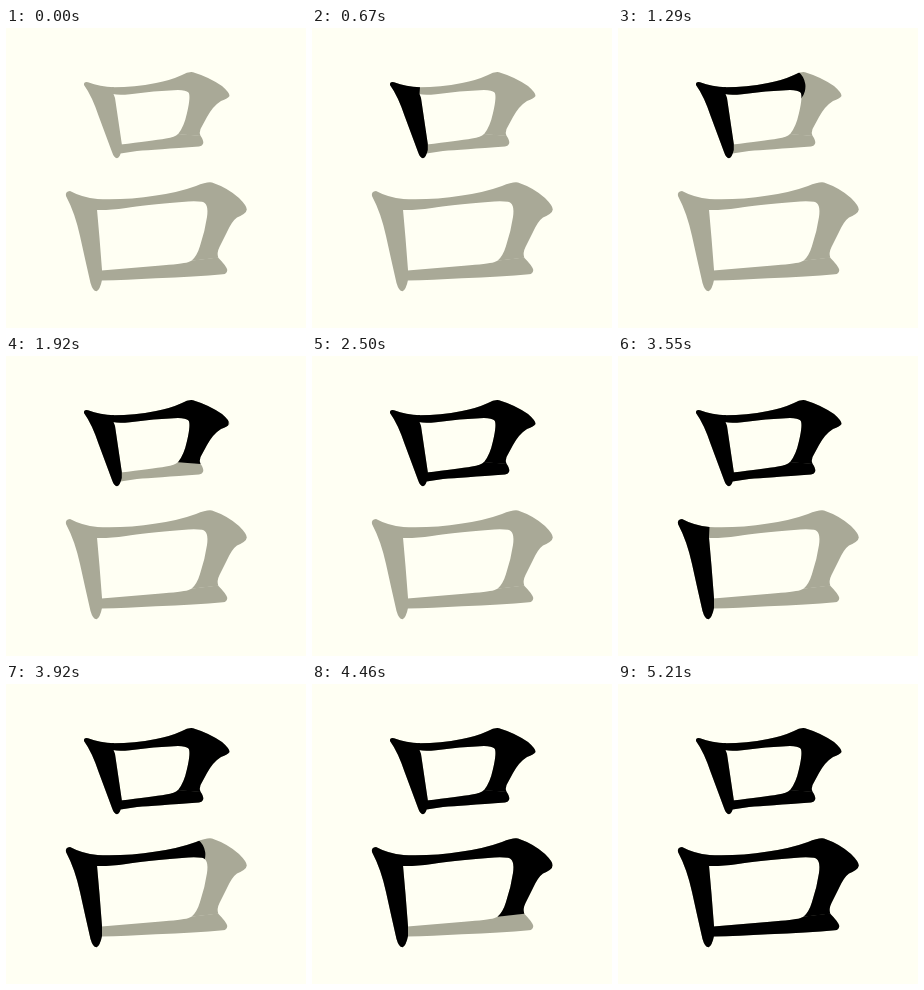
Write an HTML page with a canvas that moves like this. It is 300 px wide and 300 px high and loops after 5290 ms.

```html
<!DOCTYPE html>
<html lang="zh">
<head>
<meta charset="utf-8">
<title>Stroke order</title>
<style>
  html, body { margin: 0; width: 100%; height: 100%; overflow: hidden; background: #fffff3; }
  canvas { display: block; width: 300px; height: 300px; }
</style>
</head>
<body>
<canvas id="stage" width="300" height="300"></canvas>
<script>
const LOOP = 5290;
const SPEED = 0.24; // pixels per ms
const BRUSH = 38;
const PAPER = '#fffff3', PALE = '#a9a997', INK = '#000';

// Each stroke: start time in ms, outline, and the path the brush follows.
const strokes = [
  {
    start: 420,
    outline: 'M78 57Q77.5 53.5 82 54.2Q94 58.5 108 59.3L107.5 66L109 70L115.8 116V122Q114 129.5 111 130.3Q108 130 106 124L93 89Q86 68 78 57Z',
    median: 'M91 60L99 83L111 126V150'
  },
  {
    start: 1040,
    outline: 'M106 59.3Q127 59.5 150 55Q164 52.5 176 47Q182 43.5 187 44.2Q203 49 216 58Q224 65 223.5 68Q222 70.5 215 73Q207 78 201 89L194.5 101Q193 105 194.5 108L172 106.2Q178 99 181 85Q185 68 182.5 64.5Q180 62 172 62Q147 63 124 66.3Q112 67.5 107 66Z',
    median: 'M108 63Q150 62 185 56Q207 57 203 69Q190 82 183 105V125'
  },
  {
    start: 2000,
    outline: 'M114.5 116.5Q145 113 160 110.5Q169 109 172 106L194.5 107.8Q197.5 112 197.3 115Q196.5 118 193 118.5Q150 121.5 131 123L114.5 125.5Z',
    median: 'M116 120L190 113H215'
  },
  {
    start: 2850,
    outline: 'M60 168Q59 163.5 64 163Q76 169.5 91.5 171L91 181.5L93.5 210L96 242V252Q94 262 90.5 263.3Q87 263.5 84.5 255Q79 231 74 208Q69 185 60 168Z',
    median: 'M76 170L80 205L89 256V285'
  },
  {
    start: 3560,
    outline: 'M90.5 171Q118 172.5 150 167.5Q172 164.5 190 158Q201 153.5 206 154.5Q222 160 233 170Q241 178 240.8 181.5Q240.5 185.5 231 189.5Q226 193 221 204L213.5 219Q210.5 225 212.3 229.7L185.5 232.8Q191 228 194 218Q199 203 201 189Q203 175 196 173.8Q188 172.7 176 174Q138 177 120 180Q102 182.5 90.5 182Z',
    median: 'M94 178Q150 176 204 167Q227 171 220 184Q208 203 202 226V245'
  },
  {
    start: 4490,
    outline: 'M95.5 242.5L152 237.8Q176 236 182 234.3L186 232.5L212 229.5Q220.5 238 221.3 242Q221 246 217 246.3Q190 249 150 250.3Q120 252 95.5 252.5Z',
    median: 'M96 248L214 239H240'
  }
].map(({ start, outline, median }) => ({
  start, outline: new Path2D(outline), median: new Path2D(median)
}));

const canvas = document.getElementById('stage');
const ctx = canvas.getContext('2d');
ctx.lineWidth = BRUSH;
ctx.lineCap = ctx.lineJoin = 'round';
ctx.strokeStyle = INK;

function drawInk(stroke, elapsed) {
  const reach = elapsed * SPEED;
  if (reach <= 0) return;
  if (reach > 240) {
    ctx.fillStyle = INK;
    ctx.fill(stroke.outline);
    return;
  }
  ctx.save();
  ctx.clip(stroke.outline);
  ctx.setLineDash([reach, 1000]);
  ctx.stroke(stroke.median);
  ctx.restore();
}

function draw(time) {
  ctx.fillStyle = PAPER;
  ctx.fillRect(0, 0, 300, 300);
  ctx.fillStyle = PALE;
  for (const stroke of strokes) ctx.fill(stroke.outline);
  for (const stroke of strokes) drawInk(stroke, time - stroke.start);
}

const origin = performance.now();
function tick() {
  draw((performance.now() - origin) % LOOP);
  requestAnimationFrame(tick);
}
tick();
</script>
</body>
</html>
```
